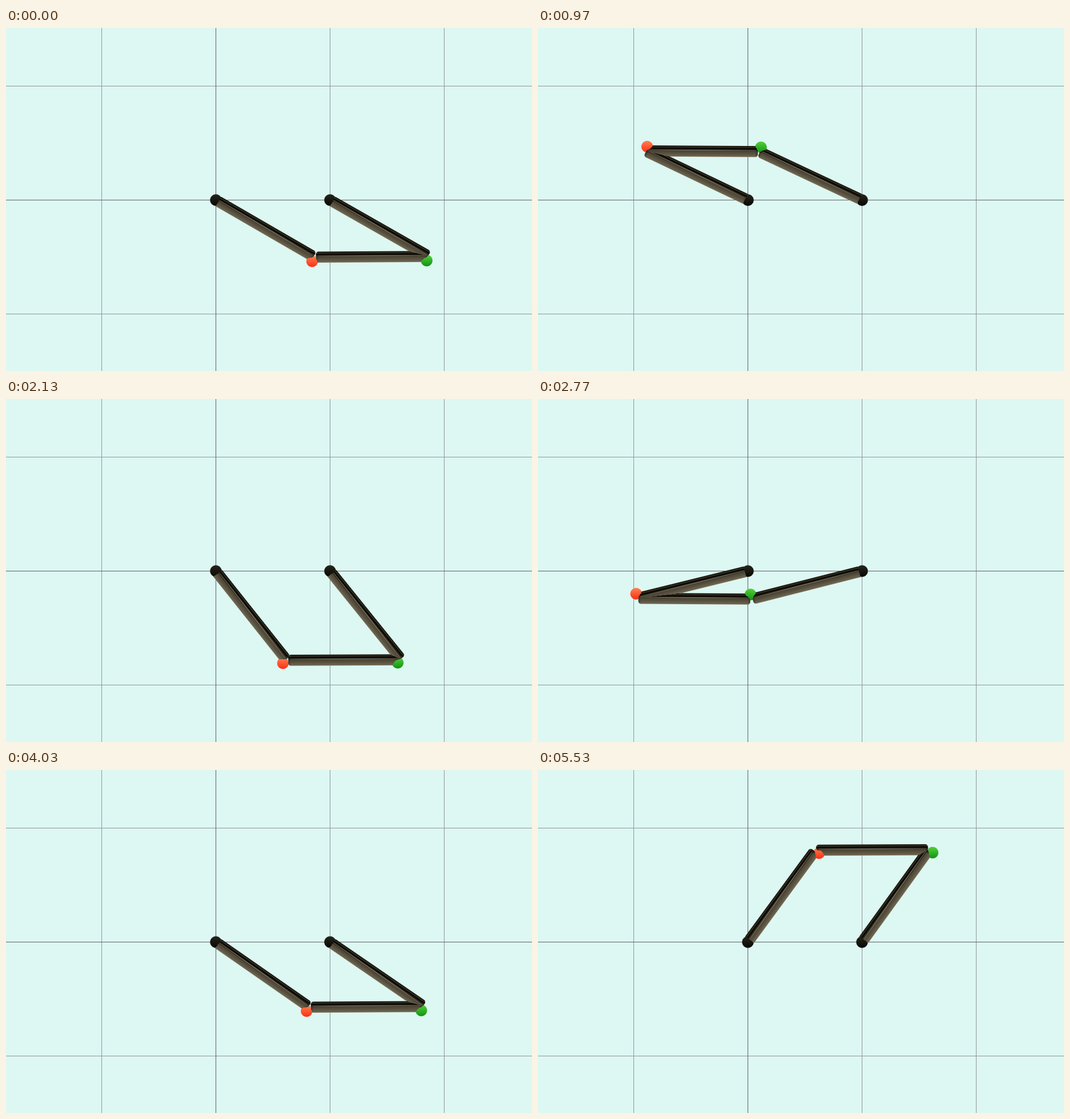
A matplotlib script for the animation above (5.56 s loop, 926x605 px).

```python
import numpy as np
import matplotlib.pyplot as plt
from matplotlib.animation import FuncAnimation

W, H, DPI = 926, 605, 100
LOOP, INTERVAL = 5560, 20
FPS, DROPPED = 30, 30

LEFT, RIGHT = np.array([369.0, 303.0]), np.array([570.0, 303.0])
ARM = 200.8                    # crank length
LAG, SLIP = 2.4, 0.4           # degrees: rods behind balls, right behind left
BALL_R, BALL_LIFT = 10.2, 0.8
ROD_R, ROD_HALF, ROUND = 9.8, 98.5, 5.0

# crank angle (degrees, clockwise) by step
STEPS = [0, 29, 63, 102, 120, 148, 165]
ANGLES = [32.5, 208.0, 414.0, 649.1, 757.3, 925.6, 1028.6]

# metal tones across a rod, from the dark side to the light side
METAL = np.array([
    (-1.00, 48, 45, 32), (-0.86, 18, 16, 8), (-0.72, 66, 63, 50),
    (-0.62, 14, 12, 5), (-0.38, 14, 12, 5), (-0.26, 52, 48, 36),
    (-0.14, 42, 38, 26), (0.02, 80, 73, 56), (0.28, 84, 77, 60),
    (0.60, 97, 90, 72), (0.88, 108, 100, 80), (1.00, 146, 136, 110)])

# ball tones: top, bottom
BLACK = (38, 38, 28), (8, 8, 4)
RED = (255, 128, 84), (252, 48, 20)
GREEN = (82, 208, 58), (18, 148, 18)


def make_background():
    img = np.empty((H, W, 3))
    img[:] = 221, 247, 243
    for x in (168, 570, 771):
        img[:, x] = 142, 150, 149
    for y in (102, 504):
        img[y] = 142, 150, 149
    img[:, 369] = img[303] = 90, 98, 97
    return img


BACKGROUND = make_background()


class Scene:
    """Tiny depth-buffered painter for balls and rods."""

    def __init__(self):
        self.img = BACKGROUND.copy()
        self.depth = np.full((H, W), -1.0)

    def window(self, center, rx, ry):
        x, y = center
        x0, x1 = max(int(x - rx), 0), min(int(x + rx) + 2, W)
        y0, y1 = max(int(y - ry), 0), min(int(y + ry) + 2, H)
        ys, xs = np.ogrid[y0:y1, x0:x1]
        return (slice(y0, y1), slice(x0, x1)), xs - x, ys - y

    def paint(self, box, color, z, cover):
        front = (cover > 0) & (z > self.depth[box])
        a = np.where(front, cover, 0)[..., None]
        self.img[box] = self.img[box] * (1 - a) + color * a
        self.depth[box] = np.where(front, z, self.depth[box])

    def ball(self, center, tones):
        box, dx, dy = self.window(center, 12, 12)
        d = np.hypot(dx, dy)
        z = np.sqrt(np.maximum(BALL_R**2 - d**2, 0)) + BALL_LIFT
        top, bottom = map(np.array, tones)
        k = np.clip(0.5 + dy / (2 * BALL_R), 0, 1)[..., None]
        color = (top + (bottom - top) * k) * np.ones(z.shape + (1,))
        self.paint(box, color, z, np.clip(BALL_R + 0.5 - d, 0, 1))

    def rod(self, start, end):
        center = (start + end) / 2
        ax, ay = (end - start) / np.hypot(*(end - start))
        rx = abs(ax) * ROD_HALF + abs(ay) * ROD_R + 2
        ry = abs(ay) * ROD_HALF + abs(ax) * ROD_R + 2
        box, dx, dy = self.window(center, rx, ry)
        u, v = dx * ax + dy * ay, dy * ax - dx * ay

        qu = np.maximum(np.abs(u) - (ROD_HALF - ROUND), 0)
        qv = np.maximum(np.abs(v) - (ROD_R - ROUND), 0)
        cover = np.clip(ROUND + 0.5 - np.hypot(qu, qv), 0, 1)

        cap = np.clip(qu / ROUND, 0, 1)
        r = ROD_R - ROUND + ROUND * np.sqrt(1 - cap**2)
        z = np.sqrt(np.maximum(r**2 - v**2, 0))

        side = np.tanh(8 * (ax - 0.35 * ay))
        w = v / ROD_R * side
        tone = w + 0.5 * cap * np.sign(u) * ay
        color = np.stack([np.interp(tone, METAL[:, 0], METAL[:, i])
                          for i in (1, 2, 3)], -1)
        # glint that drifts slightly across the rod along its length
        t = u / ROD_HALF
        drift = -0.18 + 0.16 * t * ay
        glint = np.exp(-((w - drift) / 0.07)**2) * (0.85 - 0.5 * t**2)
        rim = np.exp(-((w + 0.74) / 0.06)**2) * cap
        color += 100 * np.maximum(glint * (1 - cap), rim)[..., None]
        color *= (1 - 0.35 * cap)[..., None]
        self.paint(box, color, z, cover)


def polar(deg):
    a = np.radians(deg)
    return ARM * np.array([np.cos(a), np.sin(a)])


def step_at(ms):
    tick = int((ms + 5) * FPS / 1000)
    return tick - (tick >= DROPPED)


def render(step):
    angle = np.interp(step, STEPS, ANGLES)
    left_end = LEFT + polar(angle - LAG)
    right_end = RIGHT + polar(angle - LAG - SLIP)
    scene = Scene()
    scene.rod(LEFT, left_end)
    scene.rod(RIGHT, right_end)
    scene.rod(left_end, right_end)
    scene.ball(LEFT, BLACK)
    scene.ball(RIGHT, BLACK)
    scene.ball(LEFT + polar(angle), RED)
    scene.ball(RIGHT + polar(angle - SLIP), GREEN)
    return np.clip(scene.img, 0, 255).astype(np.uint8)


fig = plt.figure(figsize=(W / DPI, H / DPI), dpi=DPI)
picture = fig.figimage(render(0), origin="upper")


def update(i):
    picture.set_data(render(step_at(i * INTERVAL + INTERVAL / 2)))
    return [picture]


anim = FuncAnimation(fig, update, frames=LOOP // INTERVAL, interval=INTERVAL,
                     repeat=True, repeat_delay=0, blit=False)
plt.show()
```
